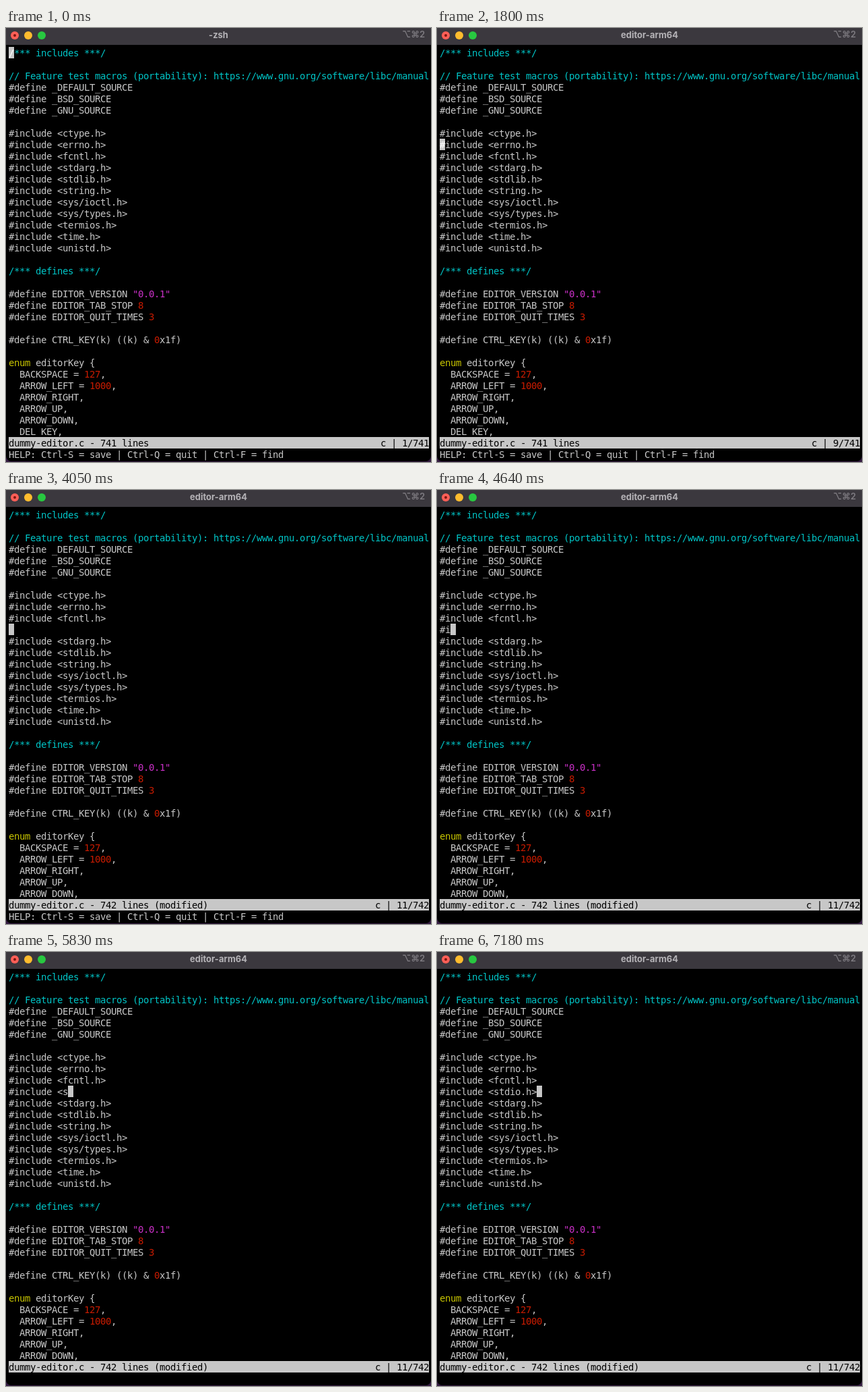
An HTML page for the animation above (8 s loop, 631 px wide and 643 px high).

```html
<!DOCTYPE html>
<html lang="en">
<head>
<meta charset="utf-8">
<title>Terminal editor</title>
<style>
  html, body { margin: 0; width: 100%; height: 100%; overflow: hidden; background: #351c42; }
  #window {
    position: relative; width: 631px; height: 642px; overflow: hidden;
    background: #000; border-radius: 0 0 8px 8px;
  }
  #bar {
    position: absolute; inset: 0 0 auto; height: 25px; background: #3b383e;
    font: 700 13px/21px Inter, "DejaVu Sans", sans-serif; color: #b5b3b7; text-align: center;
  }
  #shortcut { position: absolute; right: 9px; top: -1px; color: #7e7b81; font-weight: 600; }
  #bar svg { position: absolute; left: 0; top: 0; }
  #screen {
    position: absolute; left: 4px; top: 28px; width: 624px;
    font: 14px "DejaVu Sans Mono", monospace; letter-spacing: calc(8px - 1ch);
    color: #c7c7c7; font-variant-ligatures: none;
  }
  .row, #cursor { height: 17px; line-height: 18px; white-space: pre; }
  #cursor { position: absolute; width: 8px; background: #c7c7c7; color: #fff; }
  #status { background: #c7c7c7; color: #000; }
  .comment { color: #00c5c7; }
  .string { color: #ca30c7; }
  .keyword { color: #c7c400; }
  .number { color: #c91b00; }
</style>
</head>
<body>
<div id="window">
  <div id="bar">
    <svg width="70" height="25">
      <circle cx="13" cy="11" r="6" fill="#ff5f57"/>
      <circle cx="13" cy="11" r="2" fill="#7d1510"/>
      <circle cx="33" cy="11" r="6" fill="#febc2e"/>
      <circle cx="53" cy="11" r="6" fill="#28c840"/>
    </svg>
    <span id="title"></span>
    <span id="shortcut">⌥⌘2</span>
  </div>
  <div id="screen">
    <div id="code"></div>
    <div id="status" class="row"></div>
    <div id="message" class="row"></div>
    <div id="cursor"></div>
  </div>
</div>
<script>
const LOOP = 8000, ROWS = 34, COLUMNS = 78;
const NEWLINE_AT = 4050, MESSAGE_ENDS = 4490, TITLE_AT = 150;
const TYPED = "#include <stdio.h>";
const HELP = "HELP: Ctrl-S = save | Ctrl-Q = quit | Ctrl-F = find";

const headers = ["ctype", "errno", "fcntl", "stdarg", "stdlib", "string",
  "sys/ioctl", "sys/types", "termios", "time", "unistd"];
const source = `/*** includes ***/

// Feature test macros (portability): https://www.gnu.org/software/libc/manual
#define _DEFAULT_SOURCE
#define _BSD_SOURCE
#define _GNU_SOURCE

${headers.map(name => `#include <${name}.h>`).join("\n")}

/*** defines ***/

#define EDITOR_VERSION "0.0.1"
#define EDITOR_TAB_STOP 8
#define EDITOR_QUIT_TIMES 3

#define CTRL_KEY(k) ((k) & 0x1f)

enum editorKey {
  BACKSPACE = 127,
  ARROW_LEFT = 1000,
  ARROW_RIGHT,
  ARROW_UP,
  ARROW_DOWN,
  DEL_KEY,`.split("\n");

// Each time moves the cursor one row down.
const downTimes = [300, 450, 600, 900, 1200, 1350, 1650, 1800, 2100, NEWLINE_AT];
// [time, cursor column]
const columnKeys = [
  [0, 0], [2400, 1], [2550, 2], [2850, 3], [3150, 18], [NEWLINE_AT, 0],
  [4490, 1], [4640, 2], [4790, 3], [4940, 4], [5090, 6], [5240, 7], [5390, 8],
  [5540, 9], [5690, 10], [5830, 11], [5980, 12], [6130, 14], [6280, 15],
  [6580, 16], [6880, 17], [7180, 18],
];

const el = id => document.getElementById(id);
const TOKENS = /(?<comment>\/\*.*\*\/|\/\/.*)|(?<string>".*?")|(?<keyword>\benum\b)|(?<number>\b\d+)/g;

function span(text, className) {
  const node = document.createElement("span");
  node.textContent = text;
  node.className = className;
  return node;
}

function codeRow(line) {
  const row = document.createElement("div");
  row.className = "row";
  let end = 0;
  for (const match of line.matchAll(TOKENS)) {
    const kind = Object.keys(match.groups).find(name => match.groups[name]);
    row.append(line.slice(end, match.index), span(match[0], kind));
    end = match.index + match[0].length;
  }
  row.append(line.slice(end));
  return row;
}

function render(t) {
  const row = downTimes.filter(time => time <= t).length;
  const column = columnKeys.findLast(([time]) => time <= t)[1];
  const modified = t >= NEWLINE_AT;
  const lines = [...source];
  if (modified) lines.splice(row, 0, TYPED.slice(0, column));

  const total = modified ? 742 : 741;
  const left = `dummy-editor.c - ${total} lines${modified ? " (modified)" : ""}`;
  const right = `c | ${row + 1}/${total}`;

  el("title").textContent = t < TITLE_AT ? "-zsh" : "editor-arm64";
  el("code").replaceChildren(...lines.slice(0, ROWS).map(codeRow));
  el("status").textContent = left + right.padStart(COLUMNS - left.length);
  el("message").textContent = t < MESSAGE_ENDS ? HELP : "";
  el("cursor").textContent = lines[row][column] || "";
  el("cursor").style.left = column * 8 + "px";
  el("cursor").style.top = row * 17 + "px";
}

const changes = [TITLE_AT, MESSAGE_ENDS, ...downTimes, ...columnKeys.map(key => key[0])];
let shown = -1;

function tick() {
  const t = performance.now() % LOOP;
  const step = changes.filter(time => time <= t).length;
  if (step !== shown) render(t);
  shown = step;
  requestAnimationFrame(tick);
}
tick();
</script>
</body>
</html>
```
